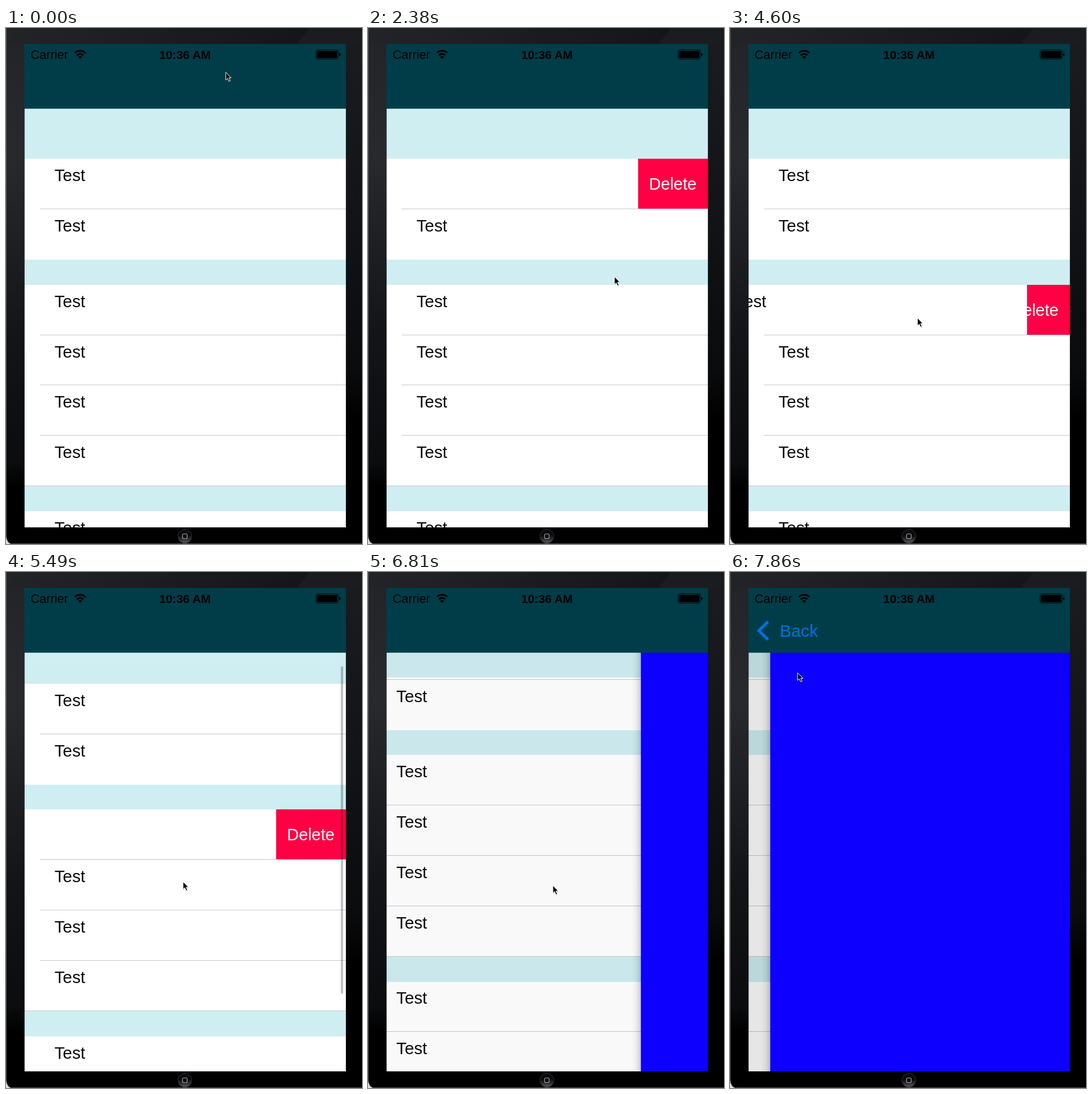
An HTML page for the animation above (8000 ms loop, 622 px wide and 900 px high).

```html
<!DOCTYPE html>
<html lang="en">
<head>
<meta charset="utf-8">
<title>Swipe to delete</title>
<style>
html, body { margin: 0; width: 100%; height: 100%; overflow: hidden; background: #000; }
svg { display: block; font-family: "Liberation Sans", Arial, sans-serif; }
.tint { fill: #cfeef2; }
.label { font-size: 29.3px; fill: #0c0c0c; }
#rows rect { shape-rendering: crispEdges; }
</style>
</head>
<body>
<svg width="622" height="900" viewBox="0 0 622 900">
  <defs>
    <linearGradient id="left" x2="0" y2="1">
      <stop stop-color="#232428"/><stop offset=".25" stop-color="#27292d"/>
      <stop offset=".6" stop-color="#131417"/><stop offset=".84" stop-color="#0b0c0e"/>
      <stop offset=".89" stop-color="#000"/>
    </linearGradient>
    <linearGradient id="right" x2="0" y2="1">
      <stop stop-color="#1b1c1f"/><stop offset=".3" stop-color="#131518"/>
      <stop offset=".66" stop-color="#0a0b0d"/><stop offset=".76" stop-color="#000"/>
    </linearGradient>
    <linearGradient id="top">
      <stop stop-color="#232428"/><stop offset="1" stop-color="#121315"/>
    </linearGradient>
    <linearGradient id="home" x2="0" y2="1">
      <stop offset=".45" stop-color="#0b0b0c"/><stop offset="1" stop-color="#56575a"/>
    </linearGradient>
    <linearGradient id="shade">
      <stop stop-color="#000" stop-opacity="0"/><stop offset=".5" stop-color="#000" stop-opacity=".05"/>
      <stop offset="1" stop-color="#000" stop-opacity=".18"/>
    </linearGradient>
  </defs>

  <!-- device body -->
  <rect width="622" height="900" fill="#000"/>
  <rect width="33" height="900" fill="url(#left)"/>
  <rect x="594" width="28" height="900" fill="url(#right)"/>
  <rect width="622" height="28" fill="url(#top)"/>
  <path d="M530 0H622V28H508Z" fill="#1b1c1f"/>
  <path d="M0 884Q1 898 9 900H0Z" fill="#ddd"/>
  <path d="M.5 0V884Q1 898 9 899.5H622" fill="none" stroke="#55565a"/>
  <circle cx="312.5" cy="886.5" r="12.2" fill="url(#home)" stroke="#2c2d2f"/>
  <rect x="308.5" y="882.5" width="8" height="8" rx="2" fill="#0b0b0c" stroke="#a0a0a2" stroke-width="1.2"/>

  <!-- list and pushed page -->
  <svg x="32" y="140" width="562" height="731" viewBox="32 140 562 731">
    <g id="list">
      <rect class="tint" x="32" y="140" width="562" height="731"/>
      <g id="rows"></g>
      <rect class="tint" id="sticky" x="32" width="562" height="44"/>
      <rect id="bar" x="585" width="4" height="571" rx="2" fill="#000" fill-opacity=".25"/>
    </g>
    <rect id="dim" x="32" y="140" width="562" height="731"/>
    <g id="page">
      <rect id="edge" x="16" y="140" width="16" height="731" fill="url(#shade)"/>
      <rect x="32" y="140" width="562" height="731" fill="#0d00ff"/>
    </g>
  </svg>

  <!-- soft screen borders -->
  <path d="M32.5 140V871" stroke="#000" stroke-opacity=".45"/>
  <path d="M593.5 140V871" stroke="#000" stroke-opacity=".15"/>

  <!-- navigation bar -->
  <rect x="32" y="28" width="562" height="112" fill="#003d48"/>
  <rect x="32" y="140" width="562" height="1" fill="#003d48" fill-opacity=".75"/>
  <text x="43" y="54" font-size="21.5">Carrier</text>
  <text x="312.8" y="54" font-size="20.7" font-weight="bold" text-anchor="middle">10:36 AM</text>
  <g fill="none" stroke="#000" stroke-width="3">
    <path d="M120.2 43.6A13.2 13.2 0 0 1 138.8 43.6"/>
    <path d="M124 47.6A7.8 7.8 0 0 1 135 47.6"/>
  </g>
  <path d="M129.5 54L125.9 50.2A5 5 0 0 1 133.1 50.2Z"/>
  <rect x="541.9" y="38.2" width="38.8" height="16" rx="3" fill="none" stroke="#000"/>
  <rect x="543.7" y="40" width="35.2" height="12.4" rx="1.5"/>
  <path d="M582 43.5Q584.5 44 584.5 46.2T582 49Z"/>
  <g id="back" fill="#007aff">
    <path d="M66.5 86.5L50.5 102.3L66.5 118" fill="none" stroke="#007aff" stroke-width="5"/>
    <text id="title" y="112.5" font-size="30">Back</text>
  </g>

  <g id="cursor">
    <path d="M.5 1V14.6L3.6 11.7L6 17L8.5 15.9L6.1 10.7H10Z" transform="translate(.6 1)" fill="#000" fill-opacity=".22"/>
    <path d="M.5 .8V14.2L3.6 11.3L5.9 16.6L8.3 15.6L6 10.4H10Z" fill="#000" stroke="#fff"/>
  </g>
</svg>
<script>
const $ = id => document.getElementById(id);
const place = (el, x, y) => el.setAttribute("transform", `translate(${x} ${y})`);
const ramp = (s, start, length) => Math.min(1, Math.max(0, (s - start) / length));
const smooth = x => x * x * (3 - 2 * x);

const LOOP = 8000, TICK = 148;
const WIDTH = 562, ROW = 87.8, HEADER = ROW / 2, BUTTON = 122, SCROLL = 128.3;

// Each cell slides over its red button; the separator stays put.
let y = 228.2, html = "";
for (const count of [2, 4, 3]) {
  for (let i = 1; i <= count; i++, y += ROW) {
    const x = i < count ? 59 : 32;
    html += `
      <rect x="${594 - BUTTON}" y="${y}" width="${BUTTON}" height="${ROW}" fill="#ff0044"/>
      <text x="574" y="${y + 54}" font-size="28.7" fill="#fff" text-anchor="end">Delete</text>
      <g class="cell"><rect x="32" y="${y}" width="${WIDTH}" height="${ROW}" fill="#fff"/>
      <text class="label" x="84.7" y="${y + 39}">Test</text></g>`;
    // The first section has no closing line.
    if (i < count || count > 2)
      html += `<rect x="${x}" y="${y + ROW - 1}" width="${594 - x}" height="1" fill="#c8c7cc"/>`;
  }
  y += HEADER;
}
$("rows").innerHTML = html;
const cells = document.querySelectorAll(".cell");

// Steps at which the first three cells begin to open and to close.
const swipes = [[7.44, 18.88], [19.61, 22.3], [28.14, 35.77]];

// Pointer stops: step, x, y.
const stops = [
  [0, 383.5, 76.5], [6, 480, 240], [8, 416, 252], [10, 322, 258], [14, 430, 433],
  [20, 378, 377], [22, 292, 380], [25, 380, 490], [29, 327, 505], [30, 252, 507],
  [32, 305, 591.5], [34, 307, 591.5], [37, 312.5, 435], [43, 322.5, 546], [44, 322.5, 546],
  [49, 42, 158], [51, 117.5, 175],
];

function pointer(s) {
  const n = Math.max(1, stops.findIndex(p => p[0] >= s));
  const [a, ax, ay] = stops[n - 1], [b, bx, by] = stops[n];
  const f = ramp(s, a, b - a);
  return [ax + (bx - ax) * f, ay + (by - ay) * f];
}

function draw() {
  const t = performance.now() % LOOP;
  const s = Math.max(0, Math.min(51, Math.floor((t - 440) / TICK) + 1));
  const scrolled = smooth(ramp(s, 34, 3));
  const scroll = SCROLL * scrolled;
  const push = smooth(ramp(s, 43, 3.4)) - .068 * ramp(s, 50, 1);

  swipes.forEach(([open, close], i) =>
    place(cells[i], BUTTON * (ramp(s, close, 1.4) - ramp(s, open, 1.4)), 0));
  place($("rows"), 0, -scroll);
  $("sticky").setAttribute("y", Math.max(140, 184 - scroll));
  $("bar").setAttribute("y", 141 + 91 * scrolled);
  $("bar").setAttribute("opacity", ramp(s, 34, 1) - ramp(s, 39, 2));

  place($("list"), -.3 * WIDTH * push, 0);
  $("dim").setAttribute("opacity", .105 * push);
  place($("page"), WIDTH * (1 - push), 0);
  $("edge").setAttribute("opacity", push > 0 ? 1 : 0);
  $("back").setAttribute("opacity", Math.max(0, 2 * push - 1));
  $("title").setAttribute("x", 77 + 147 * (1 - push));

  place($("cursor"), ...pointer(s));
  requestAnimationFrame(draw);
}
draw();
</script>
</body>
</html>
```
